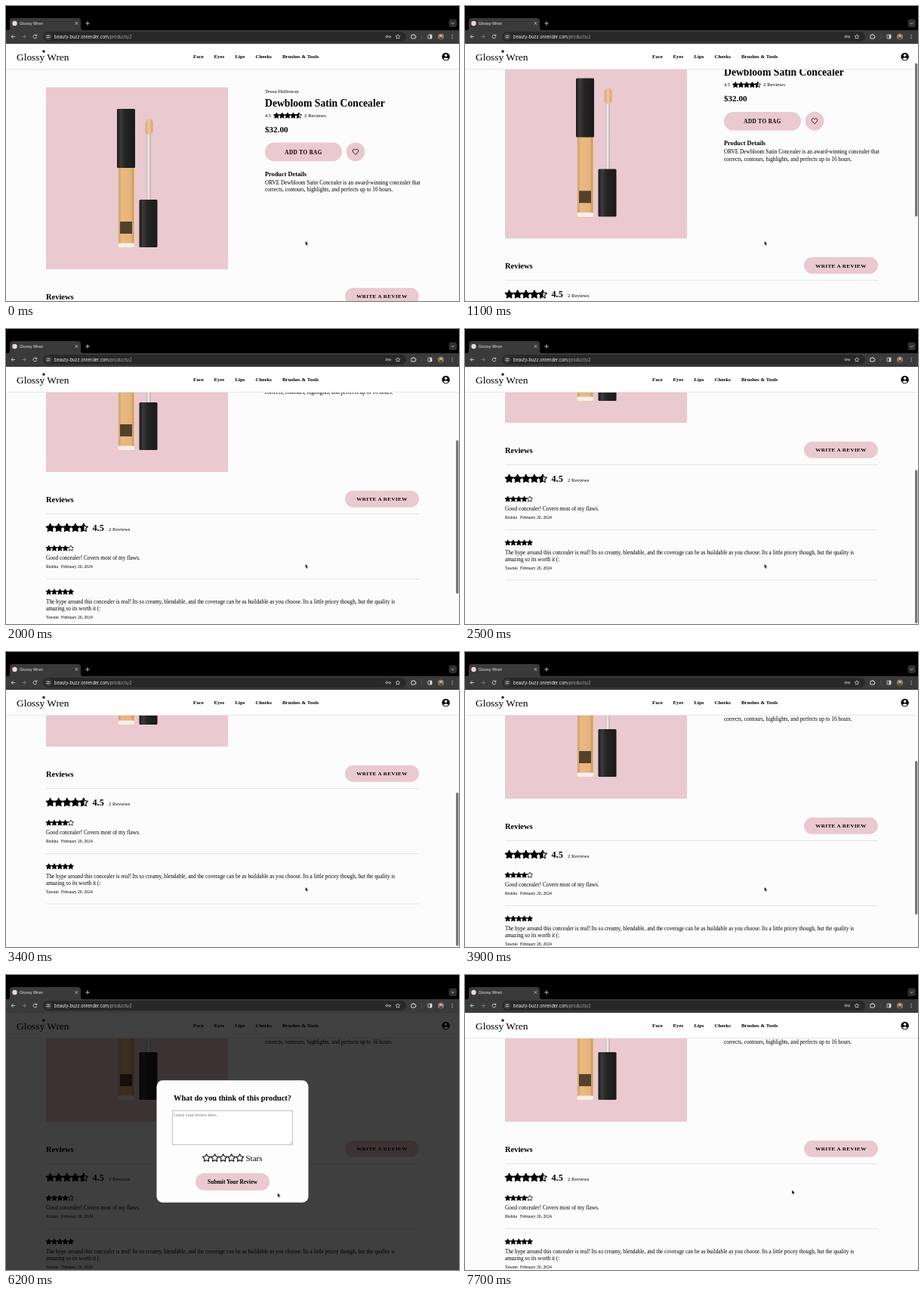
These frames come from a looping animation (600x390 px, 7800 ms). An HTML page:

```html
<!DOCTYPE html>
<html lang="en">
<head>
<meta charset="utf-8">
<title>Product page</title>
<style>
  html, body { margin: 0; width: 100%; height: 100%; overflow: hidden; background: #000; }
  svg { display: block; width: 600px; height: 390px; }
  text { font-family: "Liberation Serif", "Times New Roman", serif; white-space: pre; }
  .ui { font-family: Inter, Roboto, sans-serif; }
</style>
</head>
<body>
<svg id="stage" viewBox="0 0 600 390" xmlns="http://www.w3.org/2000/svg"></svg>
<script>
const PINK = '#eac9d1', PAGE = '#fdfcfd';
const SHOP = 'Glossy Wren', ITEM = 'Dewbloom Satin Concealer';
const LOOP = 7800, STEP = 100;

const text = (x, y, size, str, extra = '') =>
  `<text x="${x}" y="${y}" font-size="${size}" ${extra}>${str}</text>`;
const bold = (x, y, size, str, extra = '') =>
  text(x, y, size, str, 'font-weight="700" ' + extra);
const rect = (x, y, w, h, fill, r = 0, extra = '') =>
  `<rect x="${x}" y="${y}" width="${w}" height="${h}" rx="${r}" fill="${fill}" ${extra}/>`;
const line = (d, color, w = 1) =>
  `<path d="${d}" fill="none" stroke="${color}" stroke-width="${w}" stroke-linecap="round" stroke-linejoin="round"/>`;
const circle = (x, y, r, fill, extra = '') =>
  `<circle cx="${x}" cy="${y}" r="${r}" fill="${fill}" ${extra}/>`;
const rule = y => rect(53, y, 494, 0.8, '#dedcdd');

function starPath(cx, cy, r, half) {
  const pts = [];
  for (let i = 0; i <= (half ? 5 : 9); i++) {
    const a = -Math.PI / 2 - i * Math.PI / 5, k = i % 2 ? r * 0.51 : r;
    pts.push((cx + k * Math.cos(a)).toFixed(2) + ',' + (cy + k * Math.sin(a)).toFixed(2));
  }
  return 'M' + pts.join('L') + 'Z';
}

// Five stars, `score` of them filled; halves allowed.
function stars(x, y, gap, r, score) {
  let out = '';
  for (let i = 0; i < 5; i++) {
    const cx = x + gap * (i + 0.5), left = score - i;
    const path = (half, fill) =>
      `<path d="${starPath(cx, y, r, half)}" fill="${fill}" stroke="#000" stroke-width="${r * 0.2}" stroke-linejoin="round"/>`;
    out += path(false, left >= 1 ? '#000' : 'none');
    if (left === 0.5) out += path(true, '#000');
  }
  return out;
}

const gradient = (id, stops) =>
  `<linearGradient id="${id}">${stops.map(([o, c]) => `<stop offset="${o}" stop-color="${c}"/>`).join('')}</linearGradient>`;

const defs = `<defs>
  ${gradient('cap', [[0, '#191919'], [0.2, '#3b3a3a'], [0.45, '#242424'], [1, '#1a1a1a']])}
  ${gradient('tube', [[0, '#f0d9c1'], [0.1, '#d5a26e'], [0.25, '#e9b981'], [0.75, '#e6b47d'], [0.9, '#cf9a66'], [1, '#f2dfcc']])}
  ${gradient('stem', [[0, '#b9adaf'], [0.35, '#f3eef0'], [0.65, '#e0d8da'], [1, '#b3a6a9']])}
  ${gradient('tip', [[0, '#d9a877'], [0.5, '#edc79d'], [1, '#d5a26f']])}
  <clipPath id="view"><rect y="84" width="600" height="306"/></clipPath>
</defs>`;

const bottle =
  rect(147.5, 213, 23.5, 107, 'url(#tube)', 2) +
  rect(148.5, 313.5, 21.5, 6, '#f5efec', 1.5) +
  rect(147, 136, 24, 78, 'url(#cap)', 1.5) +
  rect(151, 285, 16, 16, '#54402f') +
  rect(186.3, 166, 5.4, 92, 'url(#stem)') +
  '<path d="M184.5 167V154Q186 149 191 148.5Q195 150 194.5 157V166Q193 170 189.5 170Q185.5 170 184.5 167Z" fill="url(#tip)"/>' +
  rect(176.5, 256, 24, 63, 'url(#cap)', 1.5);

function review(y, score, lines, who) {
  const foot = y + 17.6 + lines.length * 8.8;
  return stars(53, y, 7.3, 3.9, score) +
    lines.map((s, i) => text(53, y + 15 + i * 8.8, 7.25, s)).join('') +
    text(53, foot, 5.7, who) + text(73, foot, 5.7, 'February 20, 2024');
}

const page =
  rect(53, 107.5, 241, 240.5, PINK) + bottle +
  text(343, 114.5, 7.1, 'Tessa Holloway') +
  bold(343, 133, 13.7, ITEM) +
  text(343, 147, 6.4, '4.5') + stars(354.5, 145, 7.4, 4, 4.5) + text(395, 147, 6.9, '2 Reviews') +
  bold(343, 166.5, 11.1, '$32.00') +
  rect(343, 180.5, 102, 24.7, PINK, 12.3) +
  bold(394, 195.5, 7.2, 'ADD TO BAG', 'text-anchor="middle" letter-spacing=".45"') +
  circle(463, 192.8, 12.4, PINK) +
  line('M463 196.3L459.9 193.2C457.6 190.2 461.3 187.8 463 190.5C464.7 187.8 468.4 190.2 466.1 193.2Z', '#111', 0.9) +
  bold(343, 224.5, 8.3, 'Product Details') +
  text(343, 236, 7.3, `ORVE ${ITEM} is an award-winning concealer that`) +
  text(343, 245.2, 7.3, 'corrects, contours, highlights, and perfects up to 16 hours.') +
  bold(53, 387.7, 10.45, 'Reviews') +
  rect(449, 372.7, 98, 22, PINK, 11) +
  bold(498, 386.4, 7.1, 'WRITE A REVIEW', 'text-anchor="middle" letter-spacing=".4"') +
  rule(403) +
  stars(53, 422, 11.1, 5.7, 4.5) + bold(114.5, 426, 12.2, '4.5') + text(136, 426, 6.8, '2 Reviews') +
  review(449, 4, ['Good concealer! Covers most of my flaws.'], 'Rishita') +
  rule(489) +
  review(506.7, 5, [
    'The hype around this concealer is real! Its so creamy, blendable, and the coverage can be as buildable as you choose. Its a little pricey though, but the quality is',
    'amazing so its worth it (:'
  ], 'Tawnie') +
  rule(555.6);

const header =
  rect(0, 50, 600, 33.5, '#fefefe') + rect(0, 83, 600, 0.8, '#e3e2e3') +
  text(14, 72, 13.4, SHOP) + circle(50, 60, 1.8, '#222') +
  [['Face', 248], ['Eyes', 275.5], ['Lips', 303.5], ['Cheeks', 330.5], ['Brushes &amp; Tools', 366]]
    .map(([s, x]) => bold(x, 69.3, 6.9, s)).join('') +
  circle(582.6, 67, 5.2, '#000') + circle(582.6, 65.2, 1.7, '#fff') +
  '<path d="M579.2 69.8Q582.6 66.6 586 69.8Q582.6 73 579.2 69.8Z" fill="#fff"/>';

const arrow = (x, dir, color) =>
  line(`M${x - 2.3} 40.5H${x + 2.3}M${x + dir * 0.2} 38.2L${x + dir * 2.3} 40.5L${x + dir * 0.2} 42.8`, color, 0.8);

const browser =
  rect(0, 0, 600, 50, '#000') +
  rect(0, 32, 600, 18, '#3a3a3b') +
  '<path d="M2 32Q5 32 5 29V20Q5 16 9 16H95Q99 16 99 20V29Q99 32 102 32Z" fill="#3a3a3b"/>' +
  circle(11.5, 23, 3.2, '#ecd5da') +
  text(18, 24.8, 5.2, SHOP, 'class="ui" fill="#eee"') +
  line('M91.8 21.3L95 24.5M95 21.3L91.8 24.5', '#ddd', 0.7) +
  line('M105.7 23H110.3M108 20.7V25.3', '#ddd', 0.8) +
  rect(586.5, 17.5, 10.5, 10.5, '#303031', 3) + line('M590 22.2L591.7 23.9L593.4 22.2', '#ddd', 0.8) +
  arrow(9.5, -1, '#ddd') + arrow(24, 1, '#858585') +
  line('M40.2 38.8A2.4 2.4 0 1 0 40.8 41.2M40.8 37.8V39.3H39.2', '#ddd', 0.8) +
  rect(49, 34, 481, 13, '#282829', 6.5) + circle(56, 40.5, 4.6, '#3d3d3e') +
  line('M54 39.3H55.6M57.2 39.3H58M54 41.7H54.8M56.4 41.7H58', '#ddd', 0.7) +
  circle(56.5, 39.3, 0.6, '#ddd') + circle(55.5, 41.7, 0.6, '#ddd') +
  text(64, 42.5, 5.6, 'beauty-buzz.onrender.com<tspan fill="#a6a6a6">/products/2</tspan>', 'class="ui" fill="#f2f2f2"') +
  circle(504.2, 40.5, 1.3, 'none', 'stroke="#ccc" stroke-width=".8"') +
  line('M505.7 40H509.5M507.5 41.3V42M509.2 40.5V42', '#ccc', 0.8) +
  `<path d="${starPath(519, 40.7, 3, false)}" fill="none" stroke="#ddd" stroke-width=".7"/>` +
  line('M537.3 38.5H539V37.7H540.5V38.5H542V40H542.9V41.5H542V43H537.3Z', '#ddd', 0.9) +
  rect(550, 37, 0.6, 7, '#565657') +
  rect(559, 38, 5, 5, 'none', 0.6, 'stroke="#ddd" stroke-width=".8"') + rect(561.6, 38, 2.4, 5, '#ddd') +
  circle(576, 40.5, 4, '#8c7a66') + circle(576, 39.4, 1.6, '#cfae94') + rect(574, 41.3, 4, 2.6, '#5e463a', 1.2) +
  [38.3, 40.5, 42.7].map(y => circle(591, y, 0.6, '#ddd')).join('');

const modal =
  rect(0, 50, 600, 340, '#000', 0, 'opacity=".75"') +
  rect(199.5, 139.3, 201, 161.5, '#fdfdfd', 8) +
  bold(300, 166.2, 10.36, 'What do you think of this product?', 'text-anchor="middle"') +
  rect(220.2, 179.2, 159.6, 45, '#fefefe', 0, 'stroke="#858585" stroke-width=".5"') +
  text(222, 187.2, 5.9, 'Leave your review here...', 'fill="#757575"') +
  line('M376 223.3L379 220.3M377.7 223.3L379 222', '#777', 0.4) +
  stars(260, 242, 11.05, 5.3, 0) + text(317.5, 245.6, 11, 'Stars') +
  rect(251, 262, 98, 22.8, PINK, 11.4) +
  bold(300, 276.3, 7.5, 'Submit Your Review', 'text-anchor="middle"');

const stage = document.getElementById('stage');
stage.innerHTML = defs +
  rect(0, 50, 600, 340, PAGE) +
  `<g clip-path="url(#view)"><g id="page">${page}</g></g>` + header + browser +
  rect(596, 51, 3.4, 203, '#777', 1.7, 'id="thumb"') +
  `<g id="modal">${modal}</g>` +
  '<path id="cursor" d="M0 0V5.9L1.3 4.7L2.2 6.8L3.2 6.4L2.3 4.3H4.1Z" fill="#000" stroke="#fff" stroke-width=".5"/>';

const el = id => document.getElementById(id);
const parts = { page: el('page'), thumb: el('thumb'), modal: el('modal'), cursor: el('cursor') };

// Keys are [time, ...values]; values run linearly between them.
function track(keys, t) {
  const i = keys.findIndex(k => k[0] > t);
  if (i === 0) return keys[0].slice(1);
  if (i < 0) return keys[keys.length - 1].slice(1);
  const a = keys[i - 1], b = keys[i], p = (t - a[0]) / (b[0] - a[0]);
  return a.slice(1).map((v, n) => v + (b[n + 1] - v) * p);
}

const scrollKeys = [[500, 0], [800, 14], [1600, 85], [2200, 196], [2500, 224],
  [3300, 224], [3400, 223], [3600, 200], [3900, 154]];
const cursorKeys = [[3900, 396.5, 310.5], [4100, 440, 270], [4300, 476, 232.5],
  [4900, 476, 232.5], [5300, 462, 288], [5500, 440, 304.5], [5700, 411, 296], [5900, 359.7, 288],
  [6300, 359.7, 288], [6800, 336, 277], [6900, 336, 277], [7200, 395, 280], [7400, 433, 284]];

function draw(ms) {
  const t = Math.floor(ms % LOOP / STEP) * STEP;
  const [scroll] = track(scrollKeys, t), [x, y] = track(cursorKeys, t);
  parts.page.setAttribute('transform', `translate(0 ${-scroll})`);
  parts.thumb.setAttribute('y', 51 + scroll * 0.604);
  parts.thumb.style.display = t >= 600 && t < 4400 ? '' : 'none';
  parts.modal.style.display = t >= 4500 && t < 7700 ? '' : 'none';
  parts.cursor.setAttribute('transform', `translate(${x} ${y})`);
}

const start = performance.now();
function tick() {
  draw(performance.now() - start);
  requestAnimationFrame(tick);
}
tick();
</script>
</body>
</html>
```
